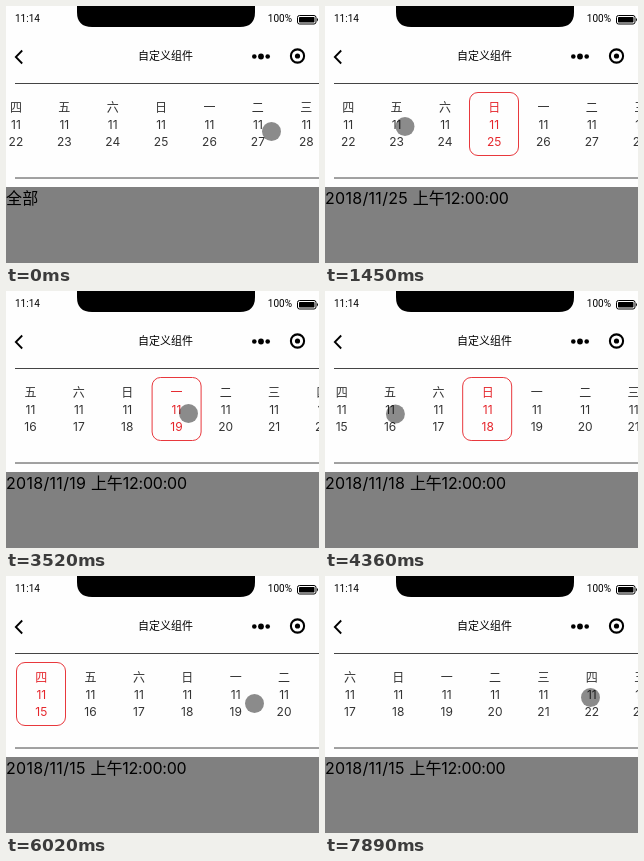
An HTML page that plays this animation: 313x257 px, repeating every 8 s.

```html
<!DOCTYPE html>
<html lang="zh-CN">
<head>
<meta charset="utf-8">
<title>自定义组件</title>
<style>
  html, body { margin: 0; width: 100%; height: 100%; overflow: hidden; background: #fff; }
  #stage {
    position: relative; width: 313px; height: 257px; overflow: hidden; background: #fefefe;
    color: #000; font-family: Inter, "Noto Sans CJK SC", "Noto Sans CJK", sans-serif;
  }
  #stage > * { position: absolute; white-space: nowrap; }
  svg { left: 0; top: 0; }
  .status { top: 6px; font: 10px/14px Roboto, sans-serif; }
  #title { left: 0; width: 319px; top: 41.5px; text-align: center; font-size: 11px; line-height: 16px; }
  #strip { left: 10.3px; top: 86px; display: flex; }
  .day {
    flex: none; width: 48.4px; height: 62px;
    text-align: center; font-size: 12px; line-height: 17px; color: #333;
  }
  .day div { position: relative; top: 7px; height: 17px; }
  .day.on { width: 48px; border: 1px solid #e8383d; border-radius: 9px; color: #e5262c; }
  .day.on div { top: 5.5px; }
  #panel { left: 0; top: 181px; width: 313px; height: 76px; background: #808080; font-size: 16px; line-height: 22px; }
  #date { letter-spacing: .3px; }
  #time { letter-spacing: -.2px; }
  #cursor {
    left: -9.5px; top: -9.5px; width: 19px; height: 19px; border-radius: 50%;
    background: rgba(0, 0, 0, .45);
  }
</style>
</head>
<body>
<div id="stage">
  <svg width="313" height="257">
    <path d="M71 0H249V6Q249 21 234 21H86Q71 21 71 6Z"/>
    <rect x="291.5" y="9.5" width="18.5" height="8.5" rx="2" fill="none" stroke="#000"/>
    <rect x="293" y="11" width="15.5" height="5.5" rx=".7"/>
    <path d="M311 12q2 1.7 0 3.5z"/>
    <path d="M16.2 44.5L9.8 51L16.2 57.5" fill="none" stroke="#000" stroke-width="1.8"/>
    <circle cx="248.3" cy="50.5" r="2.3"/>
    <circle cx="255" cy="50.5" r="2.9"/>
    <circle cx="261.7" cy="50.5" r="2.3"/>
    <circle cx="291.5" cy="50" r="6.6" fill="none" stroke="#000" stroke-width="2.1"/>
    <circle cx="291.5" cy="50" r="2.6"/>
    <path d="M9 77.5H313M9 172H313" stroke="#444"/>
  </svg>
  <div class="status" style="left:9px">11:14</div>
  <div class="status" style="right:27px">100%</div>
  <div id="title">自定义组件</div>
  <div id="strip"></div>
  <div id="panel"><span id="date"></span><span id="time"></span></div>
  <div id="cursor"></div>
</div>
<script>
  const LOOP = 8000, TICK = 207.6, FIRST_DAY = 15, LAST_DAY = 30;
  const [strip, date, time, cursor] =
    ['strip', 'date', 'time', 'cursor'].map(id => document.getElementById(id));

  const easeOut = p => 1 - (1 - p) ** 2.6;

  // A track is a list of eased glides, each starting where the last one ended
  const track = value => [{ start: 0, ticks: 1, from: value, to: value }];
  const endOf = glides => glides.at(-1).to;
  const glide = (glides, start, ticks, to) =>
    glides.push({ start, ticks, from: endOf(glides), to });
  function valueAt(glides, tick) {
    const { start, ticks, from, to } = glides.findLast(g => g.start <= tick);
    return from + (to - from) * easeOut(Math.min(1, (tick - start) / ticks));
  }

  const xs = track(265), ys = track(125), scroll = track(363.3);
  const selections = [{ start: 0, day: 0 }];
  let now = 0;

  function move(ticks, x, y) {
    glide(xs, now, ticks, x);
    glide(ys, now, ticks, y);
    now += ticks;
  }
  function drag(ticks, x, y) {
    glide(scroll, now, ticks, endOf(scroll) + endOf(xs) - x);
    move(ticks, x, y);
  }
  // Selecting a day scrolls it to the middle, as far as the list allows
  function tap(day) {
    selections.push({ start: now, day });
    glide(scroll, now, 2, Math.max(0, 48.6 * (day - FIRST_DAY) - 136));
  }

  move(4, 155, 122);
  tap(25);
  move(3, 79.5, 120);
  move(1, 24, 124);
  drag(2, 71, 128);
  tap(22);
  now += 1;
  move(2, 24, 124);
  drag(2, 182, 122);
  tap(19);
  now += 2;
  move(3, 121, 122);
  tap(18);
  move(4, 24, 123);
  now += 2;
  tap(15);
  move(3, 248, 127);
  drag(3, 90, 124);
  move(2, 215, 122);
  drag(4, 265, 121);

  for (let d = FIRST_DAY; d <= LAST_DAY; d++) {
    const day = document.createElement('div');
    day.className = 'day';
    day.innerHTML = ['日一二三四五六'[(d + 3) % 7], 11, d].map(s => `<div>${s}</div>`).join('');
    strip.append(day);
  }

  let shown = -1;
  function draw(tick) {
    if (tick === shown) return;
    shown = tick;
    const selected = selections.findLast(s => s.start <= tick).day;
    strip.style.transform = `translateX(${-valueAt(scroll, tick)}px)`;
    cursor.style.transform = `translate(${valueAt(xs, tick)}px, ${valueAt(ys, tick)}px)`;
    [...strip.children].forEach((day, i) => day.classList.toggle('on', i + FIRST_DAY === selected));
    date.textContent = selected ? `2018/11/${selected} ` : '全部';
    time.textContent = selected ? '上午12:00:00' : '';
  }

  // The picture updates in discrete ticks rather than continuously
  const start = performance.now();
  function loop() {
    const t = (performance.now() - start) % LOOP;
    draw(Math.min(now, Math.floor((t + 12) / TICK)));
    requestAnimationFrame(loop);
  }
  draw(0);
  requestAnimationFrame(loop);
</script>
</body>
</html>
```
